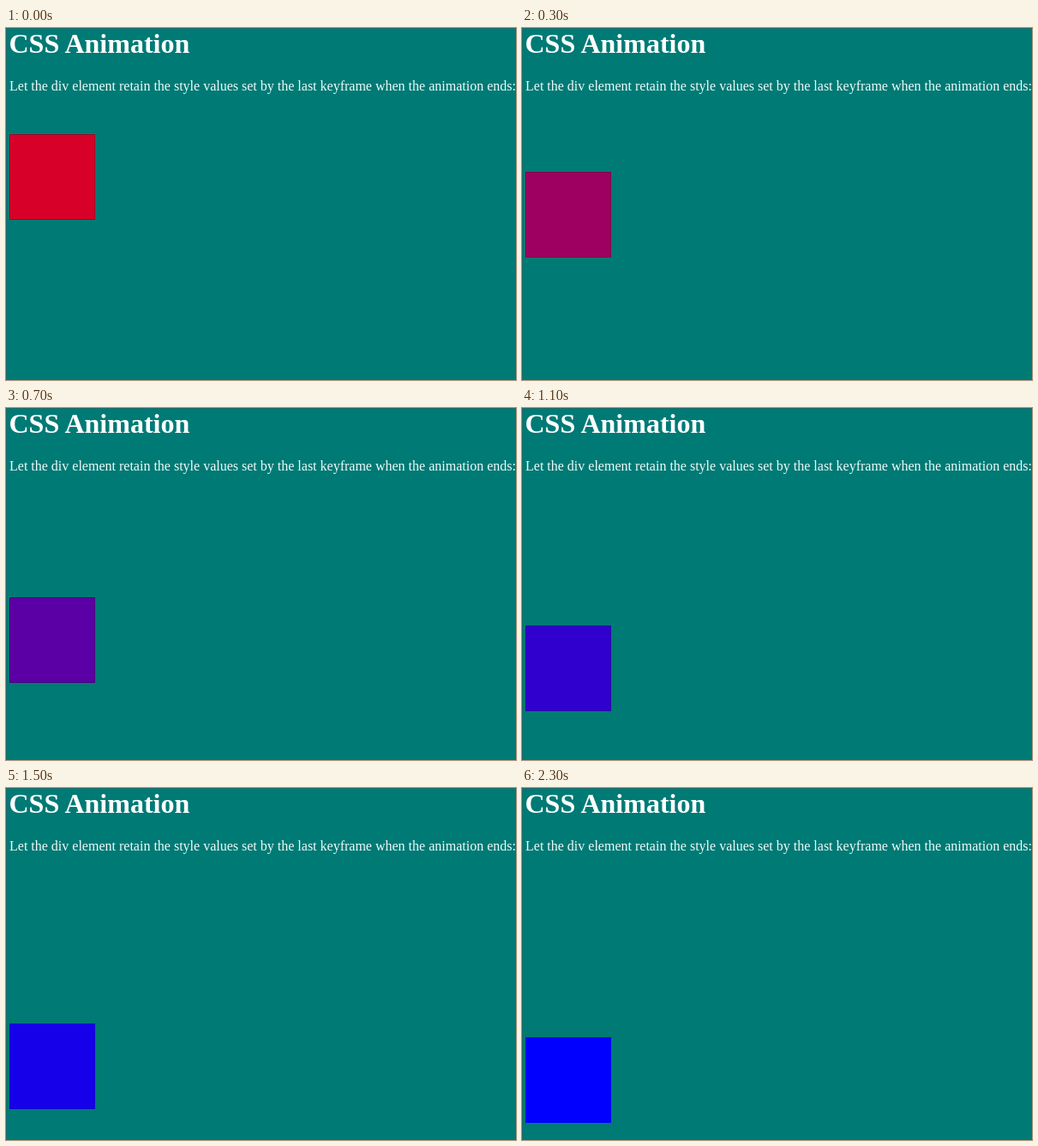
Animation of 595 by 411 pixels, one loop 2400 ms. Source, as an HTML page:

```html
<!DOCTYPE html>
<html lang="en">
<head>
<meta charset="utf-8">
<title>CSS Animation</title>
<style>
  html, body { margin: 0; width: 100%; height: 100%; overflow: hidden; background: #007a75; }
  svg { display: block; }
  text { fill: #eefcfa; font: 16px "Liberation Serif", "Times New Roman", serif; }
  .title { fill: #fff; font-size: 32px; font-weight: bold; font-kerning: none; word-spacing: -1.76px; }
</style>
</head>
<body>
<svg width="595" height="411" viewBox="0 0 595 411">
  <path d="M0 .5H595M.5 0V411" stroke="#1c6966" fill="none"/>
  <text class="title" x="3.5" y="29">CSS Animation</text>
  <text x="4" y="73">Let the div element retain the style values set by the last keyframe when the animation ends:</text>
  <g id="box">
    <rect id="fill" width="100" height="100"/>
    <rect id="edge" x=".5" y=".5" width="99" height="99" fill="none" stroke="#000"/>
  </g>
</svg>
<script>
  const LOOP = 2400, STEP = 100;
  const START = 0.1365, DURATION = 2955; // the loop shows part of a longer ease
  const TOP = 92, TRAVEL = 200;
  const [box, fill, edge] = ["box", "fill", "edge"].map(id => document.getElementById(id));

  // CSS "ease": cubic-bezier(.25, .1, .25, 1)
  function ease(x) {
    let lo = 0, hi = 1;
    for (let i = 0; i < 30; i++) {
      const s = (lo + hi) / 2;
      if (0.75 * s - 0.75 * s * s + s ** 3 < x) lo = s; else hi = s;
    }
    return 0.3 * lo + 2.4 * lo ** 2 - 1.7 * lo ** 3;
  }

  function draw(time) {
    const t = Math.floor((time % LOOP) / STEP) * STEP;
    const p = ease(START + t / DURATION);
    box.setAttribute("transform", `translate(4 ${Math.round(TOP + TRAVEL * p)})`);
    fill.setAttribute("fill", `rgb(${Math.round(255 * (1 - p))},0,${Math.round(255 * p)})`);
    edge.setAttribute("stroke-opacity", 0.25 * (1 - p ** 8));
  }

  const origin = performance.now();
  function tick() {
    draw(performance.now() - origin);
    requestAnimationFrame(tick);
  }
  tick();
</script>
</body>
</html>
```
